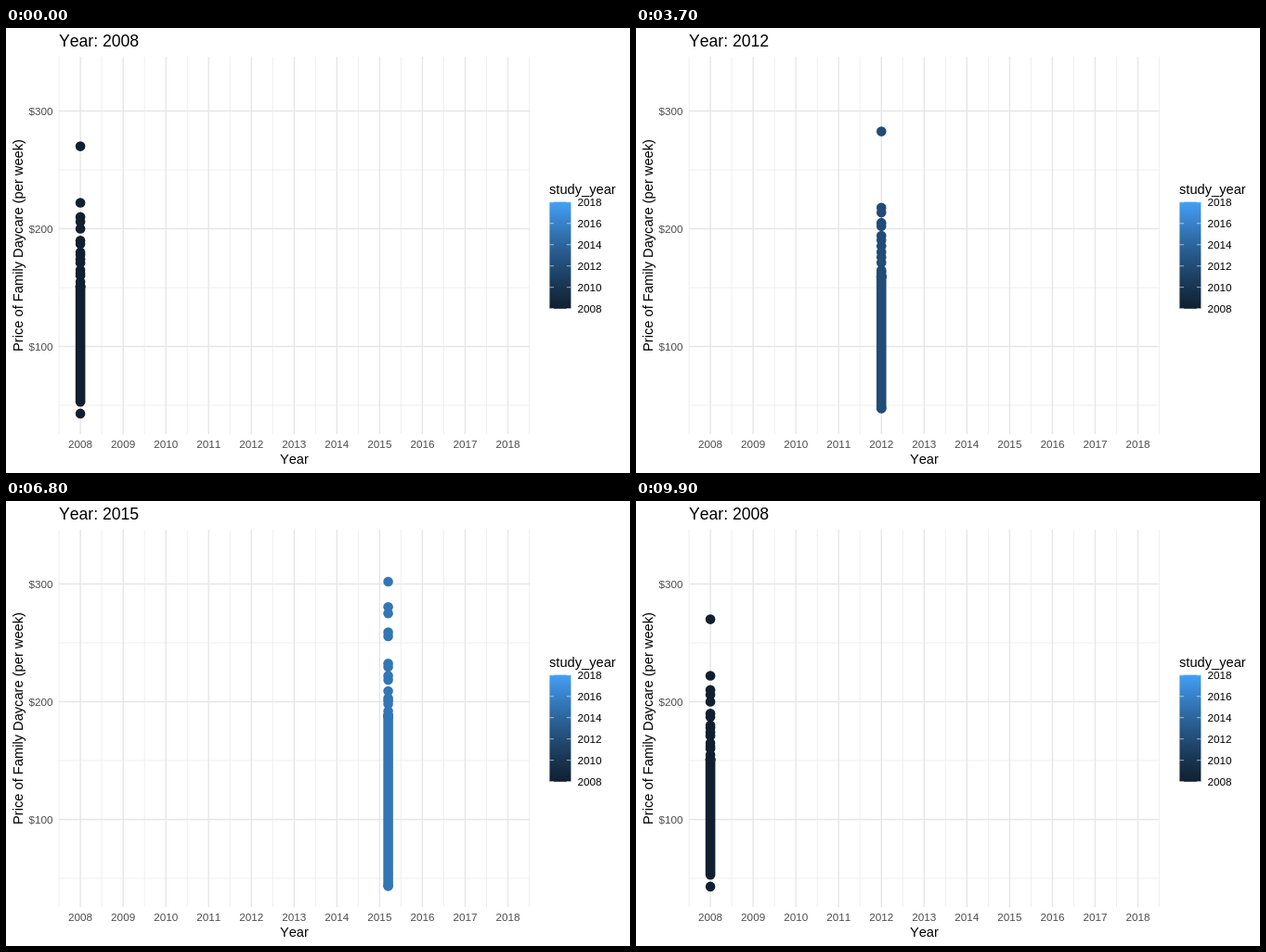
An HTML page for the animation above (10 s loop, 672 by 480 pixels).

```html
<!DOCTYPE html>
<html lang="en">
<head>
<meta charset="utf-8">
<title>Daycare prices by year</title>
<style>
  html, body { margin: 0; width: 100%; height: 100%; overflow: hidden; background: #fff; }
  svg { display: block; width: 672px; height: 480px; }
  text { font: 11.73px "Liberation Sans", Arial, sans-serif; font-kerning: none; }
  .title { font-size: 17.6px; }
  .label { font-size: 14.67px; }
  .tick { fill: #4d4d4d; }
  .mid { text-anchor: middle; }
  .end { text-anchor: end; }
  .major { stroke: #e6e6e6; stroke-width: 1.4; }
  .minor { stroke: #ebebeb; stroke-width: .8; }
  .notch { stroke: #fff; stroke-width: .7; stroke-opacity: .8; }
</style>
</head>
<body>
<svg viewBox="0 0 672 480">
  <defs><linearGradient id="ramp" x1="0" y1="1" x2="0" y2="0"></linearGradient></defs>
  <g id="grid"></g>
  <g id="dots"><line id="column" stroke-width="10.6" stroke-linecap="round"/></g>
  <text id="title" class="title" x="57" y="20"></text>
  <text class="label mid" x="310.4" y="470">Year</text>
  <text class="label mid" transform="translate(18 234.5) rotate(-90)">Price of Family Daycare (per week)</text>
  <text class="label" x="585" y="179">study_year</text>
  <rect x="585.4" y="187.6" width="23" height="115.2" fill="url(#ramp)"/>
  <g id="legend"></g>
</svg>
<script>
const FIRST = 2008, LAST = 2018, LOOP = 10000, STEP = 100, HEADS = 18;
const $ = id => document.getElementById(id);
const lerp = (a, b, t) => a + (b - a) * t;
const px = year => 80.1 + (year - FIRST) * 46.04;
const py = price => 470.5 - price * 1.27;

// Price spread: separate upper points, then the solid range and the lowest point.
const poses = [
  { year: 2008, heads: [270, 222, 210, 206, 200, 190, 187, 180, 178, 174, 171, 165, 162, 160, 155], top: 151, low: 53, tail: 43 },
  { year: 2009.5, heads: [272.5, 224.5, 214.5, 207, 200, 198, 190, 185, 180, 177, 174, 169], top: 164, low: 57, tail: 49.5 },
  { year: 2011, heads: [275, 206, 200.5, 195, 191.5, 187, 183, 178, 172, 168, 163], top: 157, low: 50, tail: 50 },
  { year: 2013.2, heads: [291.7, 232, 229.5, 217, 215, 202.4, 199, 194, 190, 185, 181, 174, 170, 165], top: 162, low: 44.5, tail: 44.5 },
  { year: 2015.2, heads: [302, 280.5, 275, 259, 255.5, 232.5, 229.5, 222, 218.5, 209, 203, 201, 198, 192], top: 188, low: 43.5, tail: 43.5 },
  { year: 2017.2, heads: [298, 295.5, 288.5, 284, 272, 253, 248, 240, 237.5, 229, 218.5, 215, 209, 203, 198, 193, 190], top: 185, low: 41.5, tail: 41.5 }
].map(p => ({
  year: p.year,
  values: [...Array.from({ length: HEADS }, (_, i) => p.heads[i] ?? p.top), p.tail, p.top, p.low]
}));

// Transition starts and their step counts.
const moves = [400, 1400, 2400, 3300, 4200, 5000, 5900, 6800, 7700, 8600, 9500]
  .map((start, i) => ({ start, steps: i < 2 ? 6 : 5 }));

function add(parent, tag, attrs, text) {
  const el = document.createElementNS("http://www.w3.org/2000/svg", tag);
  for (const name in attrs) el.setAttribute(name, attrs[name]);
  if (text !== undefined) el.textContent = text;
  return parent.appendChild(el);
}

const rule = (parent, kind, x1, y1, x2, y2) => add(parent, "line", { class: kind, x1, y1, x2, y2 });

function shade(year) {
  const t = (year - FIRST) / (LAST - FIRST);
  const part = (base, slope, bend) => Math.round(base + t * (slope + t * bend));
  return `rgb(${part(16, 40, 12)},${part(32, 96, 32)},${part(48, 158, 40)})`;
}

function spread(year) {
  const next = poses.findIndex(p => p.year > year);
  if (next < 0) return poses[poses.length - 1].values;
  const a = poses[next - 1], b = poses[next];
  const t = (year - a.year) / (b.year - a.year);
  return a.values.map((v, i) => lerp(v, b.values[i], t));
}

function buildChart() {
  const grid = $("grid"), legend = $("legend");
  for (let p = 50; p <= 250; p += 100) rule(grid, "minor", 57, py(p), 563.8, py(p));
  for (let y = FIRST - .5; y <= LAST + .5; y++) rule(grid, "minor", px(y), 31, px(y), 438);
  for (let p = 100; p <= 300; p += 100) {
    rule(grid, "major", 57, py(p), 563.8, py(p));
    add(grid, "text", { class: "tick end", x: 50.6, y: py(p) + 4.3 }, "$" + p);
  }
  for (let y = FIRST; y <= LAST; y++) {
    rule(grid, "major", px(y), 31, px(y), 438);
    add(grid, "text", { class: "tick mid", x: px(y), y: 453 }, y);
    add($("ramp"), "stop", { offset: (y - FIRST) / (LAST - FIRST), "stop-color": shade(y) });
  }
  for (let y = FIRST; y <= LAST; y += 2) {
    const at = 302.6 - (y - FIRST) * 11.48;
    rule(legend, "notch", 585.4, at, 590, at);
    rule(legend, "notch", 603.8, at, 608.4, at);
    add(legend, "text", { x: 615.5, y: at + 4.3 }, y);
  }
}

buildChart();
const dots = Array.from({ length: HEADS + 1 }, () => add($("dots"), "circle", { r: 5.3 }));

function stateAt(time) {
  const tick = Math.floor(time / STEP);
  let i = 0;
  while (i < moves.length && tick >= moves[i].start / STEP + moves[i].steps - 1) i++;
  if (i === moves.length) return { year: FIRST, name: FIRST, values: spread(FIRST) };
  const { start, steps } = moves[i];
  const t = Math.max(0, (tick - start / STEP + 1) / steps);
  const from = FIRST + i, to = from === LAST ? FIRST : from + 1;
  const year = lerp(from, to, t);
  const values = to > from
    ? spread(year)
    : spread(from).map((v, k) => lerp(v, spread(to)[k], t));
  return { year, name: t > .5 ? to : from, values };
}

function draw(time) {
  const { year, name, values } = stateAt(time);
  const x = px(year), color = shade(year), column = $("column");
  $("title").textContent = "Year: " + name;
  $("dots").setAttribute("fill", color);
  $("dots").setAttribute("stroke", "none");
  dots.forEach((dot, i) => {
    dot.setAttribute("cx", x);
    dot.setAttribute("cy", py(values[i]));
  });
  column.setAttribute("stroke", color);
  column.setAttribute("x1", x);
  column.setAttribute("x2", x);
  column.setAttribute("y1", py(values[HEADS + 1]));
  column.setAttribute("y2", py(values[HEADS + 2]));
}

let origin;
function loop(now) {
  origin ??= now;
  draw((now - origin) % LOOP);
  requestAnimationFrame(loop);
}
draw(0);
requestAnimationFrame(loop);
</script>
</body>
</html>
```
